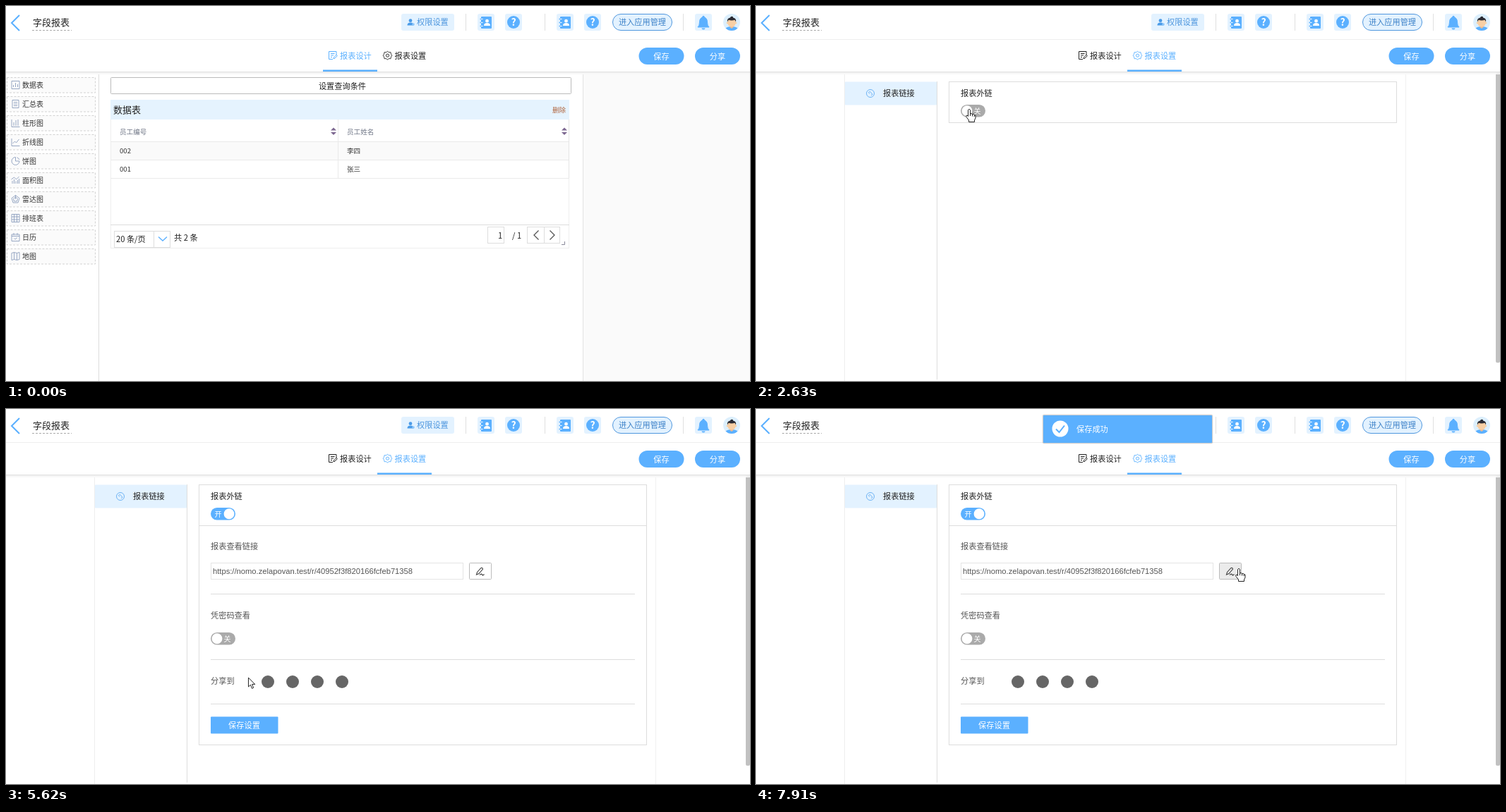
An HTML page for the animation above (7.99 s loop, 1054 px wide and 532 px high).

```html
<!DOCTYPE html>
<html lang="zh">
<head>
<meta charset="utf-8">
<style>
html, body { margin: 0; width: 100%; height: 100%; overflow: hidden; background: #fff; }
svg { display: block; }
text { font-family: "Noto Sans CJK SC", "Noto Sans CJK", sans-serif; white-space: pre; }
.latin { font-family: "Liberation Sans", Arial, sans-serif; }
</style>
</head>
<body>
<script>
const BLUE = '#5bb0ff', PALE = '#e3f2ff', LOOP = 7990;

// Text is placed by its left edge (or middle) and its vertical centre.
const text = (x, cy, s, color = '#222', size = 11.2, more = '') =>
  `<text x="${x}" y="${cy + size * .38}" font-size="${size}" fill="${color}" ${more}>${s}</text>`;
const mid = (x, cy, s, color, size) => text(x, cy, s, color, size, 'text-anchor="middle"');
const rect = (x, y, w, h, fill, stroke = 'none', rx = 0, more = '') =>
  `<rect x="${x}" y="${y}" width="${w}" height="${h}" fill="${fill}" stroke="${stroke}" rx="${rx}" ${more}/>`;
const path = (d, stroke, width = 1, fill = 'none', more = '') =>
  `<path d="${d}" stroke="${stroke}" stroke-width="${width}" fill="${fill}" ${more}/>`;
const circle = (x, y, r, fill, stroke = 'none', more = '') =>
  `<circle cx="${x}" cy="${y}" r="${r}" fill="${fill}" stroke="${stroke}" ${more}/>`;
const at = (x, y, s, more = '') => `<g transform="translate(${x} ${y})" ${more}>${s}</g>`;
const group = (id, s) => `<g id="${id}">${s}</g>`;
const hline = (x1, x2, y, color) => path(`M${x1} ${y}H${x2}`, color);
const vline = (x, y1, y2, color) => path(`M${x} ${y1}V${y2}`, color);

const person = (x, y, color) => at(x, y,
  circle(0, -2.3, 2.4, color) + path('M-4.5 4.5Q-4.5 .5 0 .5T4.5 4.5Z', 'none', 0, color));
const tile = x => rect(x, 11, 24, 24, PALE, 'none', 3);
const contacts = x => tile(x) + rect(x + 5, 15, 15, 17, BLUE, 'none', 1) +
  path(`M${x + 3.5} 18.5h4m-4 5h4m-4 5h4`, BLUE, 1.6) +
  path(`M${x + 5} 18.5h2.5m-2.5 5h2.5m-2.5 5h2.5`, '#fff') + person(x + 13.5, 23.5, '#fff');
const help = x => tile(x) + circle(x + 12, 23, 9, BLUE) +
  text(x + 12, 23, '?', '#fff', 14, 'text-anchor="middle" font-weight="700"');
const pill = (x, s) => rect(x, 59, 64, 24, BLUE, 'none', 12) + mid(x + 32, 71.5, s, '#fff');

const bell = path('M980 30Q982.5 28 982.5 23Q982.5 16.5 988 15.5Q993.5 16.5 993.5 23Q993.5 28 996 30Z', BLUE, 1, BLUE) +
  circle(988, 15.2, 1.5, BLUE) + path('M985.5 31.5a2.5 2 0 0 0 5 0Z', 'none', 0, BLUE);
const avatar = circle(1028, 23, 12, '#dceffd') +
  path('M1019.5 31.5Q1022 29 1028 29T1036.5 31.5Q1033 35 1028 35T1019.5 31.5Z', 'none', 0, BLUE) +
  path('M1025.5 27h5v3l-2.5 2-2.5-2Z', 'none', 0, '#f0b98c') +
  circle(1022, 24, 1.3, '#f8cfa4') + circle(1034, 24, 1.3, '#f8cfa4') +
  path('M1022.3 19h11.4v5.5q-1 5-5.7 5t-5.7-5Z', 'none', 0, '#f8cfa4') +
  path('M1022 22.5Q1021 17.5 1026 16.6Q1026.5 14.5 1028.5 14.8T1030 16.6Q1035 17.5 1034 22.5L1032.5 19.8Q1028 21 1023.5 19.8Z', 'none', 0, '#2b2b33');

const tabIcon = {
  design: path('M11 6V.5H.5V11.5H6M3 3.5h5.5M3 6h4M3 8.5h2M7 10.8l.5-2L11 5.3l1.3 1.3L8.8 10.2Z', 'currentColor'),
  gear: path('M6 .3L7.8 1.7L10.5 1.7L11 4.3L12.3 6.2L11 8.1L10.5 10.7L7.8 10.7L6 12.1L4.2 10.7L1.5 10.7L1 8.1L-.3 6.2L1 4.3L1.5 1.7L4.2 1.7Z', 'currentColor', .9) +
    circle(6, 6.2, 2.1, 'none', 'currentColor', 'stroke-width=".9"'),
};
const tab = (id, x, icon, s) => group(id, at(x, 64, icon) + text(x + 16, 70.5, s, 'currentColor'));

const header =
  rect(0, 93, 1054, 1, '#e2e2e2') + rect(0, 94, 1054, 1.5, '#efefef') + rect(0, 95.5, 1054, 1.5, '#f8f8f8') +
  rect(0, 0, 1054, 93, '#fff') + hline(0, 1054, 47.5, '#eee') +
  path('M19 13L8 24L19 35', BLUE, 2) + text(38, 23.5, '字段报表', '#222', 13) +
  path('M37 34.5H93', '#aaa', 1, 'none', 'stroke-dasharray="3 2"') +
  rect(560, 11, 75, 24, PALE, 'none', 3) + person(573, 23, '#4a9be8') + circle(577, 26, 1.8, '#8cc6fb') +
  text(582, 23, '权限设置', '#4a94dd') +
  [651.5, 763.5, 959.5].map(x => vline(x, 11, 35, '#e0e0e0')).join('') +
  contacts(668) + help(707) + contacts(780) + help(819) +
  rect(859.5, 11.5, 84, 23, PALE, '#4f97de', 11.5) + mid(901.5, 23, '进入应用管理', '#3d82c8') +
  tile(976) + bell + avatar +
  tab('tabA', 457, tabIcon.design, '报表设计') + tab('tabB', 534.5, tabIcon.gear, '报表设置') +
  rect(449, 90.5, 77, 2.5, BLUE, 'none', 0, 'id="underline"') +
  pill(896.5, '保存') + pill(976, '分享');

const frame = 'M.5 .5H11.5V11.5H.5Z';
const widgets = [
  ['数据表', frame + 'M3 9V6M6 9V3M9 9V5'],
  ['汇总表', 'M1.5 .5H10.5V11.5H1.5ZM3.5 3.5h5M3.5 6h5M3.5 8.5h5'],
  ['柱形图', 'M.5 1V11.5H12M3.5 10V5M6.5 10V2M9.5 10V1'],
  ['折线图', 'M.5 1V11.5H12M2 8L5 5L7 7L11 2'],
  ['饼图', 'M6 .5A5.5 5.5 0 1 0 11.5 6H6ZM8 .8A5 5 0 0 1 11.3 4'],
  ['面积图', 'M0 5L4 2L7 5L11 1M1.5 11V7M4 11V5M6.5 11V7.5M9 11V6M11 11V4'],
  ['雷达图', 'M6 .5L11.5 4.7L9.5 11H2.5L.5 4.7ZM6 3L9 5.5L8 9H4L3 5.5ZM6 .5V6'],
  ['排班表', frame + 'M.5 4H11.5M.5 8H11.5M4 .5V11.5M8 .5V11.5'],
  ['日历', 'M.5 2H11.5V11.5H.5ZM.5 4.5H11.5M3.5 0V3M8.5 0V3M4 7.5L5.5 9L8.5 6.5'],
  ['地图', 'M.5 1.5L4 .5L8 1.5L11.5 .5V10.5L8 11.5L4 10.5L.5 11.5ZM4 .5V10.5M8 1.5V11.5'],
];
const sidebar = widgets.map(([name, d], i) => at(0, 27 * i,
  rect(1.5, 101.5, 125, 21.5, '#fbfbfb', '#d2d2d2', 0, 'stroke-dasharray="3 2"') +
  at(7.5, 106, path(d, '#8d9fbe', .9)) + text(23, 112.5, name, '#333', 10))).join('');
const sorter = x => path(`M${x - 4} 176.5l4-4 4 4ZM${x - 4} 179l4 4 4-4Z`, 'none', 0, '#7c6790');
const cell = (x, y, s, color = '#333') => text(x, y, s, color, 9.6);

const designPage =
  rect(818, 96, 236, 436, '#fafafa') + vline(131.5, 96, 532, '#ddd') + vline(817.5, 96, 532, '#e2e2e2') + sidebar +
  rect(148.5, 101.5, 652, 23, '#fff', '#bbb', 1) + mid(476.5, 113.5, '设置查询条件') +
  rect(148.5, 133.5, 649, 210, '#fff', '#eee') + rect(148, 133, 650, 28, '#e5f3fe') +
  text(152, 147.5, '数据表', '#222', 13) + cell(774, 147, '删除', '#b0643c') +
  rect(149, 192, 648, 26, '#fafafa') +
  [192.5, 218.5, 244.5].map(y => hline(148, 798, y, '#eaeaea')).join('') +
  vline(470.5, 161, 244, '#eaeaea') + vline(797.5, 161, 244, '#e5e5e5') +
  cell(161, 178, '员工编号', '#6f7686') + cell(483, 178, '员工姓名', '#6f7686') + sorter(464) + sorter(791) +
  cell(161, 205.5, '002') + cell(483, 205.5, '李四') + cell(161, 231.5, '001') + cell(483, 231.5, '张三') +
  hline(148, 798, 310.5, '#ddd') +
  rect(153.5, 319.5, 79, 23, '#fff', '#ddd') + vline(209.5, 320, 342, '#ddd') +
  text(156, 331, '20 条/页') + path('M216 327.5L222 333L228 327.5', BLUE, 1.3) + text(238, 329, '共 2 条') +
  rect(682.5, 313.5, 23, 23, '#fff', '#ddd') + text(697, 326, '1') + text(717, 326, '/ 1') +
  rect(738.5, 313.5, 46, 23, '#fff', '#ddd') + vline(762.5, 314, 336, '#ddd') +
  path('M754.5 318.5L748 325L754.5 331.5M770.5 318.5L777 325L770.5 331.5', '#555', 1.3) +
  path('M787 338.5H791.5V334', '#8a8a9a');

const toggle = (id, y) => at(290, y, rect(0, 0, 35, 17.5, '#aaa', 'none', 8.75) +
  mid(23.5, 9, '关', '#fff', 10) + circle(9, 8.75, 7.4, '#fff'), `id="${id}"`);
const label = (y, s) => text(290, y, s, '#555');

const sharePanel =
  hline(274, 907, 165.5, '#ddd') + label(194.5, '报表查看链接') +
  rect(290.5, 218.5, 357, 23, '#fff', '#e5e5e5') +
  text(293, 230, 'https://nomo.zelapovan.test/r/40952f3f820166fcfeb71358', '#555', 11.2, 'class="latin"') +
  rect(656.5, 218.5, 31, 23, '#fff', '#bbb', 1, 'id="edit"') +
  path('M666.5 235L667.5 231.5L673 225.5Q675 224.8 675.5 227L670 233.5ZM671 235.5Q674 233 674.5 235T677.5 234.5', '#444', 1.1) +
  [262.5, 355.5, 418.5].map(y => hline(290, 891, y, '#ddd')).join('') +
  label(293, '凭密码查看') + toggle('secret', 317) + label(386, '分享到') +
  [371, 406, 441, 476].map(x => circle(x, 387, 9, '#666')).join('') +
  rect(290, 436.5, 95.5, 24, BLUE, 'none', 1, 'id="save"') + mid(337.5, 449, '保存设置', '#fff');

const settingsPage =
  vline(125.5, 96, 532, '#eee') + vline(920.5, 96, 532, '#f0f0f0') + vline(256.5, 107, 530, '#ddd') +
  rect(126, 107.5, 130, 33, PALE, 'none', 1) + circle(162, 124, 5.5, 'none', '#6fb4f5') +
  path('M159.5 122.5l2-1.2 3.5 4-2 1.5M159.5 122.5l1.5 2', '#6fb4f5') + text(180, 124, '报表链接') +
  rect(273.5, 107.5, 634, 58, '#fff', '#ddd', 0, 'id="box"') + text(290, 124, '报表外链') +
  group('panel', sharePanel) + toggle('link', 140) + rect(1048, 95, 6, 411, '#c1c1c1', 'none', 2);

const toast = rect(405.5, 7.5, 242, 42, '#000', 'none', 3, 'opacity=".08"') +
  rect(406, 8, 241, 41, '#000', 'none', 2, 'opacity=".12"') + rect(407, 9, 239, 39, BLUE, 'none', 1) +
  circle(431, 28, 11.5, '#fff') + path('M425 28.5L429.5 33L437 23.5', BLUE, 2) + text(454, 28.5, '保存成功', '#fff');

const cursor = group('cursor',
  path('M0 0V13L3 10.2L5 15.3L7.2 14.4L5.1 9.5H9.3Z', '#222', 1, '#fff', 'id="arrow"') +
  path('M-1.5 1.5Q0 -1 1.5 1.5V7L3 6.5L4.5 7.5L6 7.2L7.5 8.5L9 9V13L7.5 16V18.5H-.5V16L-4 11.5Q-5 9 -3 9L-1.5 10.5Z' +
    'M1.5 7V10M4.5 7.5V10.5M7.2 8.5V11', '#222', 1, '#fff', 'id="hand"'));

document.body.innerHTML = '<svg width="1054" height="532">' + group('design', designPage) +
  group('settings', settingsPage) + header + group('toast', toast) + cursor + '</svg>';

const el = id => document.getElementById(id);
const set = (node, attrs) => { for (const k in attrs) node.setAttribute(k, attrs[k]); };
const show = (id, on) => { el(id).style.display = on ? '' : 'none'; };
const clamp = v => Math.min(1, Math.max(0, v));

// Pointer path: time, x, y of the tip
const stops = [
  [300, 640, 534], [1030, 606, 340], [1110, 590, 67], [1750, 590, 67], [2310, 310, 151], [2470, 310, 151],
  [2630, 302, 146], [3170, 303, 146], [3710, 303, 146], [4250, 350, 448], [4500, 336, 424], [4660, 334, 419],
  [5300, 330, 345], [6100, 368, 447], [6950, 368, 447], [7670, 684, 226], [LOOP, 684, 226],
];
function pointer(t) {
  const i = Math.max(1, stops.findIndex(s => s[0] > t));
  const [t0, x0, y0] = stops[i - 1], [t1, x1, y1] = stops[i];
  const k = clamp((t - t0) / (t1 - t0)), e = k * k * (3 - 2 * k);
  return [x0 + (x1 - x0) * e, y0 + (y1 - y0) * e];
}

function draw(now) {
  const t = now % LOOP, settings = t >= 1350, open = t >= 3250;
  const [x, y] = pointer(t);
  const over = (l, top, w, h) => x >= l && x <= l + w && y >= top && y <= top + h;

  show('design', !settings);
  show('settings', settings);
  el('tabA').style.color = settings ? '#222' : BLUE;
  el('tabB').style.color = settings ? BLUE : '#222';
  set(el('underline'), { x: settings ? 526 : 449 });

  show('panel', open);
  set(el('box'), { height: open ? 369 : 58 });
  const slide = clamp((t - 3170) / 160), [track, word, knob] = el('link').children;
  set(track, { fill: slide ? BLUE : '#aaa' });
  set(word, { x: slide ? 10.5 : 23.5 });
  word.textContent = slide ? '开' : '关';
  set(knob, { cx: 9 + 17 * slide });

  const onSave = open && over(290, 437, 96, 24), onEdit = open && over(656, 218, 32, 24);
  set(el('save'), { fill: onSave ? '#7cc2ff' : BLUE });
  set(el('edit'), { fill: onEdit ? '#ebebeb' : '#fff' });
  set(el('toast'), { opacity: clamp((t - 6500) / 300) });

  const hand = onSave || onEdit || over(449, 55, 154, 38) || settings && over(290, 140, 35, 18);
  show('cursor', t >= 300);
  show('hand', hand);
  show('arrow', !hand);
  set(el('cursor'), { transform: `translate(${x} ${y})` });
  requestAnimationFrame(() => draw(performance.now() - start));
}
const start = performance.now();
draw(0);
</script>
</body>
</html>
```
